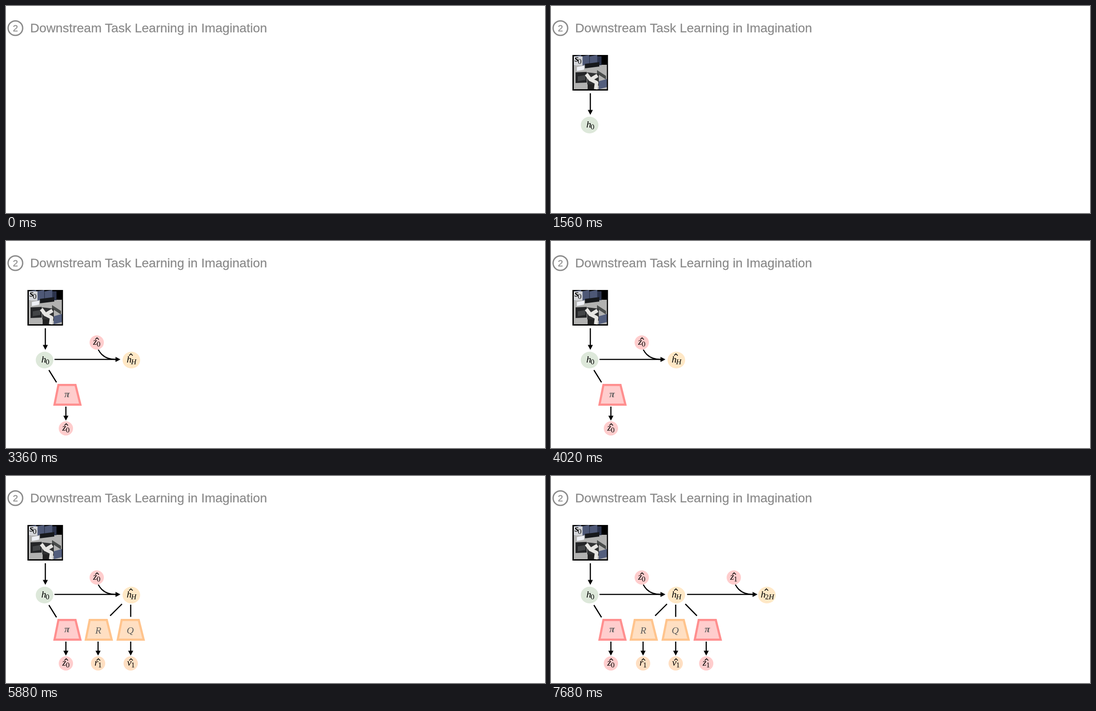
An HTML page for the animation above (8000 ms loop, 1206 by 465 pixels).

```html
<!DOCTYPE html>
<html lang="en">
<head>
<meta charset="utf-8">
<title>Downstream Task Learning in Imagination</title>
<style>
html, body { margin: 0; width: 100%; height: 100%; overflow: hidden; background: #fff; }
svg { display: block; width: 1206px; height: 465px; }
.sans { font-family: "Liberation Sans", Arial, sans-serif; fill: #8b8b8b; stroke: #8b8b8b; stroke-width: 0.3; }
.math { font-family: "Liberation Serif", "Times New Roman", serif; font-size: 22px; font-style: italic; }
.math .sub { font-size: 16.5px; }
.upright { font-style: normal; }
.line { fill: none; stroke: #000; stroke-width: 2.6; }
.hat { fill: none; stroke: #000; stroke-width: 1.7; }
.arm { fill: none; stroke: #e6e5e2; stroke-width: 8; stroke-linejoin: round; }
</style>
</head>
<body>
<svg id="stage" viewBox="0 0 1206 465">
  <circle cx="21" cy="49.7" r="16.3" fill="none" stroke="#8b8b8b" stroke-width="3"/>
  <text class="sans" x="21" y="57" font-size="21" text-anchor="middle">2</text>
  <text class="sans" x="54" y="58.5" font-size="28.5">Downstream Task Learning in Imagination</text>
</svg>
<script>
const LOOP = 8000;
const AXIS = 266;
const stage = document.getElementById("stage");

const PINK = { fill: "#ffcdcd", edge: "#ff8f8f" };
const ORANGE = { fill: "#ffdfc2", edge: "#ffc48d" };
const GREEN = "#dde8da", YELLOW = "#ffe8c6";

const line = d => `<path class="line" d="${d}"/>`;
const hat = (x, y) => `<path class="hat" d="M${x - 4} ${y + 4}l4 -4l4 4"/>`;

function symbol(x, y, letter, sub, subX, subY, weight = "normal") {
  const subs = [...sub].map(c => `<tspan class="${/\d/.test(c) ? "upright" : ""}">${c}</tspan>`).join("");
  return `<g class="math"><text x="${x}" y="${y}" font-weight="${weight}">${letter}</text>` +
    `<text class="sub" x="${subX}" y="${subY}">${subs}</text></g>`;
}

// Arrow drawn along +x, then turned about its start.
function arrow(x, y, length, angle = 0) {
  return `<g transform="translate(${x} ${y}) rotate(${angle})">` + line(`M0 0H${length - 8}`) +
    `<path d="M${length} 0l-11 -5.7v11.4z"/></g>`;
}

function latent(x, y, letter, sub, color) {
  const subX = letter === "v" ? x + 1 : x;
  return `<circle cx="${x}" cy="${y}" r="16" fill="${color}"/>` +
    symbol(x - 8, y + 5, letter, sub, subX, y + 8.7) + hat(x + 0.7, y - 10.5);
}

function hidden(x, sub, color) {
  const y = AXIS + 1.5;
  const predicted = sub !== "0";
  const left = x - 4 - 3.3 * sub.length - (predicted ? 3.2 : 0);
  return `<ellipse cx="${x}" cy="${y}" rx="19.7" ry="18.7" fill="${color}"/>` +
    symbol(left, y + 5, "h", sub, left + 9.7, y + 9) + (predicted ? hat(x - 1, y - 14) : "");
}

// Trapezoid network with its output below.
function network(x, name, palette, out, sub, outX) {
  const greek = name === "π";
  return `<path d="M${x + 11.8} 323.4h38.2l11 44.2h-58z" fill="${palette.fill}" stroke="${palette.edge}" stroke-width="4.8"/>` +
    `<text class="math" x="${x + 31}" y="${greek ? 350.5 : 353.5}" text-anchor="middle" font-weight="${greek ? "bold" : "normal"}" fill="#5d5d5d">${name}</text>` +
    arrow(outX, 372, 31.5, 90) + latent(outX, 421, out, sub, palette.fill);
}

function rollout(from, zX, sub) {
  return arrow(from, AXIS, zX - from + 53, 0) +
    line(`M${zX + 3.5} 244Q${zX + 15} ${AXIS} ${zX + 42} ${AXIS}`) + latent(zX, 228, "z", sub, PINK.fill);
}

// Parallelogram with upright sides; its top edge falls by tilt.
const slab = (x, y, w, h, tilt, fill) =>
  `<path d="M${x} ${y}l${w} ${tilt}v${h}l${-w} ${-tilt}z" fill="${fill}"/>`;

function kitchen() {
  let cabinets = "";
  for (let x = 51; x < 105; x += 18) cabinets += slab(x, 113, 16.5, 21, -3, "#4e5876");
  return slab(48, 110, 79.5, 80, 0, "#000") +
    slab(51, 132, 74, 55, 0, "#b2b2b1") +
    slab(51, 113, 62, 20, 0, "#2c344c") + cabinets +
    slab(76, 130, 32, 10, -4, "#17191c") +
    slab(58, 137, 16, 9, -3, "#eef0f5") +
    slab(103, 144, 20, 8, 13, "#4a4d4c") +
    slab(107, 169, 18, 18, -5, "#535e7d") +
    slab(55, 149, 25, 24, -1, "#242527") +
    slab(60, 158, 17, 11, -3, "#434547") +
    slab(81, 149, 26, 27, 3, "#303132") +
    slab(82, 176, 16, 11, 0, "#222") +
    `<path class="arm" d="M79 153l9 12l14 7l-2 15M89 165l15 -9"/>` +
    slab(51, 113, 19.5, 20.5, 0, "#d4d6da") +
    symbol(53, 125, "s", "0", 60, 129.5, "bold");
}

const scenes = [
  [780, kitchen()],
  [1560, arrow(88, 196, 48.5, 90) + hidden(86.3, "0", GREEN)],
  [2460, line("M96 290l17 27.5") + network(105.5, "π", PINK, "z", "0", 134)],
  [3360, rollout(108.5, 203, "0") + hidden(280.5, "H", YELLOW)],
  [4560, line("M259.5 287.5l-26.5 26.5") + network(175.5, "R", ORANGE, "r", "1", 206)],
  [5580, line("M279 289v27.5") + network(247, "Q", ORANGE, "v", "1", 279)],
  [6600, line("M300.5 287.5l26 26.5") + network(318.7, "π", PINK, "z", "1", 347.3)],
  [7560, rollout(304.5, 409, "1") + hidden(483, "2H", YELLOW)]
].map(([start, markup]) => {
  const node = document.createElementNS("http://www.w3.org/2000/svg", "g");
  node.innerHTML = markup;
  stage.append(node);
  return { start, node };
});

function render(time) {
  for (const { start, node } of scenes) {
    node.setAttribute("visibility", time >= start ? "visible" : "hidden");
  }
}

const origin = performance.now();
function tick() {
  render((performance.now() - origin) % LOOP);
  requestAnimationFrame(tick);
}
tick();
</script>
</body>
</html>
```
